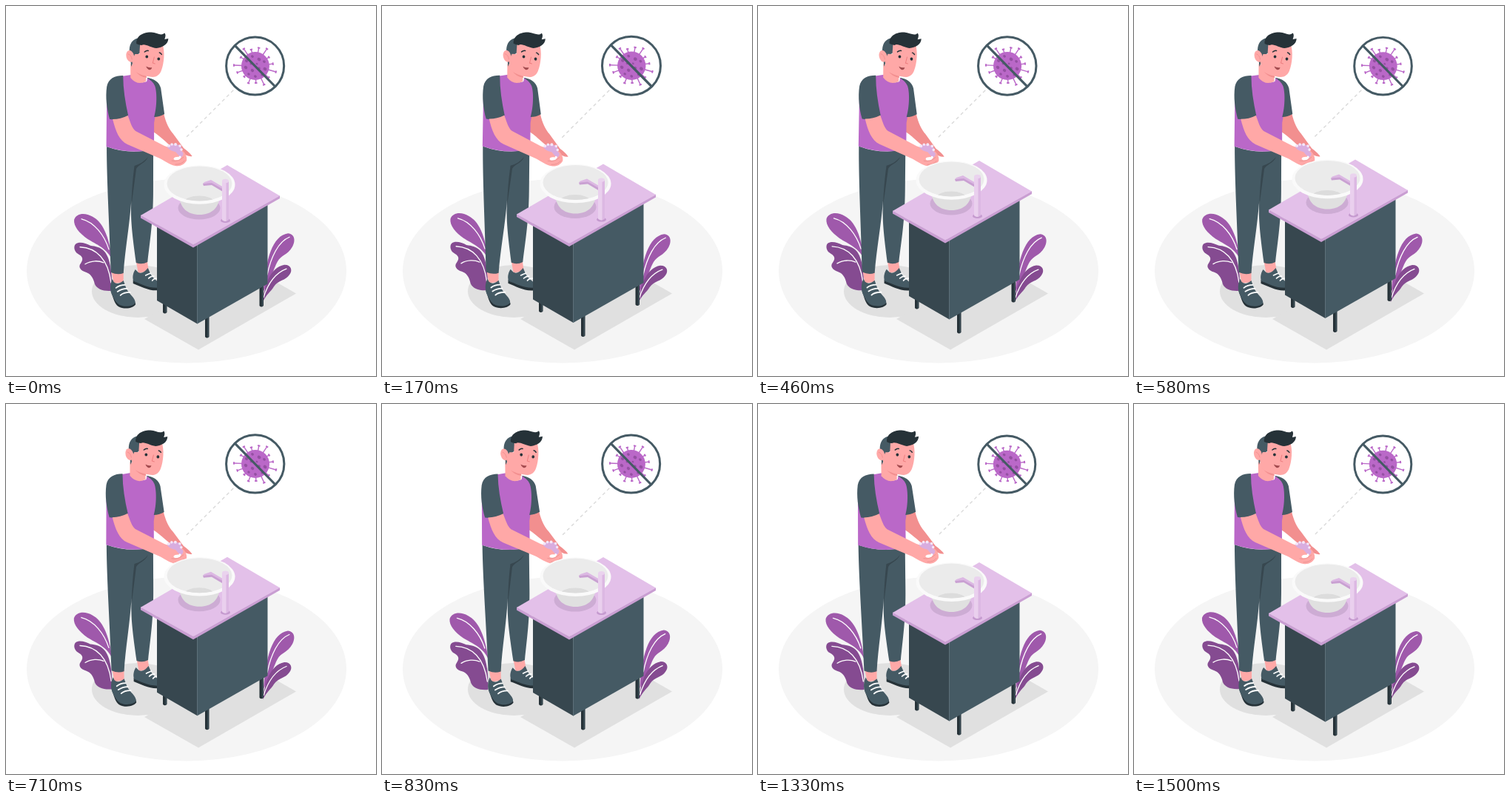
An HTML page with a canvas that plays this animation: 500 px wide and 500 px high, repeating every 1540 ms.

```html
<!DOCTYPE html>
<html lang="en">
<head>
<meta charset="utf-8">
<title>Hand washing</title>
<style>
html, body { margin: 0; width: 100%; height: 100%; overflow: hidden; background: #fff; }
canvas { display: block; }
</style>
</head>
<body>
<canvas id="stage" width="500" height="500"></canvas>
<script>
const ctx = document.getElementById('stage').getContext('2d');
const LOOP = 1540, STEPS = 37, TAU = Math.PI * 2;
const C = {
  slate: '#455a64', dark: '#37474f', ink: '#263238', skin: '#ffa8a7', skinDark: '#f28f8f',
  purple: '#ba68c8', leaf: '#9f59ab', leafDark: '#854b91', lilac: '#e3c0e9', lilacDark: '#c99ed2',
  floor: '#f5f5f5', shade: '#e0e0e0', white: '#fff'
};

function fill(color, path) {
  ctx.fillStyle = color;
  ctx.fill(new Path2D(path));
}
function line(color, width, path) {
  ctx.strokeStyle = color;
  ctx.lineWidth = width;
  ctx.stroke(new Path2D(path));
}
function oval(color, x, y, rx, ry = rx, turn = 0) {
  ctx.fillStyle = color;
  ctx.beginPath();
  ctx.ellipse(x, y, rx, ry, turn, 0, TAU);
  ctx.fill();
}
function around(x, y, angle, scale, draw) {
  ctx.save();
  ctx.translate(x, y);
  ctx.rotate(angle);
  ctx.scale(scale, scale);
  ctx.translate(-x, -y);
  draw();
  ctx.restore();
}

function drawFloor() {
  oval(C.floor, 244, 358, 216, 124.5);
  oval(C.shade, 178, 385.5, 62, 35.5);
  fill(C.shade, 'M187 423L260 464.500L392 388.500L320 347Z');
}

function drawPlants() {
  fill(C.leaf, 'M144 345C138 328 121 322 110 315C99 307 91 298 92 289C95 280 107 279 117 285C130 292 139 309 144 345Z');
  fill(C.leafDark, 'M143 385C132 386 123 383 120 376C118 367 114 362 108 360C101 358 97 353 101 348C106 341 102 338 97 335C92 332 91 325 94 322C99 318 108 321 114 324C121 325 128 326 133 332C141 341 144 362 143 385Z');
  line(C.white, 1.3, 'M102 288C119 292 133 310 139 329M100 326C122 327 138 342 142 374M107 349C115 344 125 344 132 347');
  fill(C.leaf, 'M348 385C351 342 360 310 381 307C391 308 391 318 387 325C380 337 372 336 367 345C361 356 360 366 348 385Z');
  fill(C.leafDark, 'M347 400C349 378 357 353 376 349.500C385 349 388 357 383 363C378 371 368 370 362 379C358 386 352 389 347 400Z');
  line(C.white, 1.3, 'M383 312C368 318 358 339 353 363M379 355C363 361 354 375 348 394');
}

function drawLegs() {
  fill(C.skin, 'M176 345L191 344L193 358L179 361Z');
  fill(C.skin, 'M143 359L159 359L159 373L146 375Z');
  fill(C.ink, 'M172 370L172 375C183 379 194 386 208 384L212 377Z');
  fill(C.slate, 'M175 356C171 362 171 369 173 372C184 376 196 383 210 380C211 374 200 370 196 363L192 354Q185 363 179 360Z');
  line(C.white, 1.7, 'M189 364Q193 362 196 361M193 368Q196 365 200 365M198 371Q200 368 205 368');
  fill(C.ink, 'M142 385C146 397 147 402 152 406C161 411 173 408 175.500 403L174 398Z');
  fill(C.slate, 'M144 369C140 377 141 386 144 391C147 397 149 401 154 404C163 408 173 405 175 401C175 394 167 390 163 382L159 371Q151 378 146 373Z');
  line(C.white, 1.8, 'M149 381Q154 377 161 377M151 386Q157 382 164 382M155 391Q159 387 168 387');
  fill(C.slate, 'M136 190Q165 201 199 194V250C199 290 195 315 191.500 346Q184 350 176 347C171 310 168 289 169.500 262C167 298 161 330 159 361Q151 364 142 360C140.500 310 136 235 136 190Z');
  fill(C.dark, 'M192 204C188 213 179 214 176 220L169.500 270C170 252 171 235 173.500 216C181 214 187 210 192 204Z');
}

function drawTorso() {
  // far arm
  fill(C.skinDark, 'M199 147L213 145C216 158 220 166 226 173L240 192C244 195 250 200 251.500 203C247 204 243 201 240 200L229 194C220 188 211 178 199 170Z');
  fill(C.purple, 'M156 95L169 93Q178 107 190 102L191 97C203 100 208 112 205 128L200 158L200 194Q168 201 135.500 190L136 125Z');
  fill(C.slate, 'M190 97C200 98 207 103 209 111L214 146Q207 150 200 150C204 136 204 116 201 108C199 103 195 100 190 97Z');
  fill(C.slate, 'M158 94C147 94 138 98 136 109C134 124 136 139 140 153Q154 155 165 148C161 130 158 112 158 94Z');
  // near arm
  fill(C.skin, 'M144 153Q155 153 164.500 148C168 157 170 165 175 169L214 189C223 193 233 192 239 196C243 199 245 205 244 209C241 214 236 217 229 216C222 215 214 209 208 206L164 187C153 182 148 169 144 153Z');
}

function drawHands() {
  fill('#d9addf', 'M218 191C219 187 225 186 229 187C236 187 239 192 237 196C243 200 237 204 236 205L229 197C225 196 221 195 218 191Z');
  for (const [x, y, r] of [[220, 189, 2], [224, 187, 1.8], [229, 187, 2], [235, 189, 1.8], [237, 194, 1.8]])
    oval('#f5e6f7', x, y, r);
  oval(C.white, 231, 206, 4.5, 2.2, -.1);
  oval(C.white, 235, 204, 1.6);
  line('#e8908f', .8, 'M224 209Q233 211 240 204M229 214Q238 214 241 209');
}

function drawHead() {
  fill(C.skin, 'M168 78L168 97Q177 108 189 102L189 90Z');
  fill(C.skinDark, 'M174 87Q180 96 190 97L189 93Z');
  fill(C.slate, 'M182 43C170 43 165 53 167 64L169 82L175 67L183 62Z');
  fill(C.skin, 'M181 49L211 51C215 62 213 78 210 86C208 93 203 96 198 96C188 95 180 93 172 87L170 74L174 65L180 65Z');
  oval(C.skin, 167.5, 68, 5.3, 8, -.25);
  line(C.skinDark, .9, 'M165 65Q169 66 170 72');
  fill(C.ink, 'M176 51C175 40 186 35 196 35.500C204 36 209 41 214 36.500C216 39 215 42 214 45L219 44C219 52 211 56 203 57C195 56 187 50 183 53Q180 53 176 51Z');
  oval(C.ink, 190, 68.5, 1.9, 2.1);
  oval(C.ink, 206, 71.5, 1.9, 2.1);
  line(C.ink, 1.5, 'M187 62Q190 59.500 192 60.500M207 63Q209 63.500 210 65.500');
  line('#ed7f80', 1, 'M200 69L198 77L201 78');
  fill('#a34b4f', 'M189 81.500Q193 84 197 83Q196 87 192.500 86Q190 85 189 81.500Z');
}

function drawMan() {
  drawLegs();
  drawTorso();
  drawHands();
  drawHead();
}

function drawCabinet() {
  for (const [x, top, bottom] of [[212, 392, 415], [269, 418, 448], [342.5, 374, 406]]) {
    fill(C.ink, `M${x} ${top}H${x + 5.5}V${bottom - 1}Q${x + 2.5} ${bottom + 2} ${x} ${bottom - 1}Z`);
    line(C.slate, 1, `M${x + 4} ${top}V${bottom - 1}`);
  }
  fill(C.dark, 'M204 294L258.500 323V429.500L204 398Z');
  fill(C.slate, 'M258.500 322L353.500 266V375.500L258.500 429.500Z');
  line('#5b6f79', .8, 'M258.500 326V429');
  fill(C.lilacDark, 'M182 282.500L253 322L370 256V260L253 326.500L182 286.500Z');
  fill(C.lilac, 'M182 283L299 215L370 256.500L253 322.500Z');
  drawBasin();
  drawTap();
}

function drawBasin() {
  oval('#cdacd4', 261, 273, 28.5, 15.5);
  fill('#e0e0e0', 'M234 258C236 273 245 282 261.500 282C278 282 287 273 289 258Z');
  oval('#fafafa', 261.5, 241.5, 48, 26.3);
  oval('#ebebeb', 261.5, 240, 44, 23.5);
  ctx.save();
  ctx.beginPath();
  ctx.ellipse(261.5, 240, 44, 23.5, 0, 0, TAU);
  ctx.clip();
  oval('#dcdcdc', 261, 265, 20, 8.5);
  ctx.restore();
}

function drawTap() {
  oval('#c59acf', 296.5, 290, 6.5, 3);
  fill('#c9a0d2', 'M266 240L278 238L294 247V251.500L278 242L267 243Z');
  fill('#dcb8e3', 'M266 240L268 238L277 235L294 245V248L278 239Z');
  fill('#dcb8e3', 'M292 237H301V289Q296.500 293 292 289Z');
  fill('#ead0ee', 'M292 237H297.500V291Q294 291 292 289Z');
  oval('#ead3ee', 296.5, 236.5, 4.5, 2.6);
}

function drawVirus() {
  ctx.setLineDash([4.5, 4]);
  line('#d9d9d9', 1.4, 'M244 177L308 113');
  ctx.setLineDash([]);
  oval(C.white, 336.7, 81, 39);

  // spikes: angle in degrees, reach
  const spikes = [[-178, 29], [-149, 23], [-124, 28], [-104, 23], [-79, 25], [-56, 28], [-33, 22],
    [-7, 24], [16, 29], [41, 24], [65, 28], [88, 23], [112, 25], [136, 21], [160, 26]];
  for (const [degrees, reach] of spikes) {
    ctx.save();
    ctx.translate(337, 81);
    ctx.rotate(degrees * Math.PI / 180);
    line(C.purple, 1.4, `M17 0H${reach}`);
    line(C.purple, 2, `M${reach} -1.700V1.700`);
    ctx.restore();
  }
  oval(C.purple, 337, 81, 19);
  for (const [x, y, r] of [[333, 68, 2], [342, 72, 2.5], [349, 75, 2], [325, 74, 2.2], [331, 78, 1.6], [324, 83, 2.4],
    [333, 87, 2.3], [342, 84, 2], [350, 85, 2.5], [328, 92, 1.8], [337, 95, 2], [346, 93, 1.7], [339, 78, 1.5]])
    oval('#9450a2', x, y, r, r * .85, .6);

  line(C.slate, 3.2, 'M309 53L364.500 109.500');
  ctx.strokeStyle = C.slate;
  ctx.lineWidth = 3;
  ctx.beginPath();
  ctx.arc(336.7, 81, 39.1, 0, TAU);
  ctx.stroke();
}

// eased value through [time, value] keys
function keyed(keys, t) {
  const i = keys.findIndex(([time]) => time > t);
  const [t0, v0] = keys[i - 1], [t1, v1] = keys[i];
  const p = (t - t0) / (t1 - t0);
  return v0 + (v1 - v0) * p * p * (3 - 2 * p);
}
const BEAT = [[0, .5], [200, 1], [330, 1], [600, .3], [750, .7], [980, 0], [1500, 0], [LOOP, .5]];

function render(t) {
  const sway = Math.sin((t + 80) / LOOP * TAU) - .2;
  const lift = -4.15 * (1 - Math.cos((t + 45) / LOOP * TAU));

  ctx.fillStyle = C.white;
  ctx.fillRect(0, 0, 500, 500);
  ctx.lineCap = 'round';
  drawFloor();
  around(241, 342, .0135 * sway, 1, drawPlants);
  around(193, 222, .0155 * sway, 1, drawMan);
  ctx.save();
  ctx.translate(0, lift);
  drawCabinet();
  ctx.restore();
  ctx.lineCap = 'butt';
  around(310, 109, 0, .985 + .026 * keyed(BEAT, t), drawVirus);
}

function tick() {
  const step = LOOP / STEPS;
  const now = performance.now() % LOOP;
  render(Math.floor((now + 5) / step) % STEPS * step);
  requestAnimationFrame(tick);
}
tick();
</script>
</body>
</html>
```
